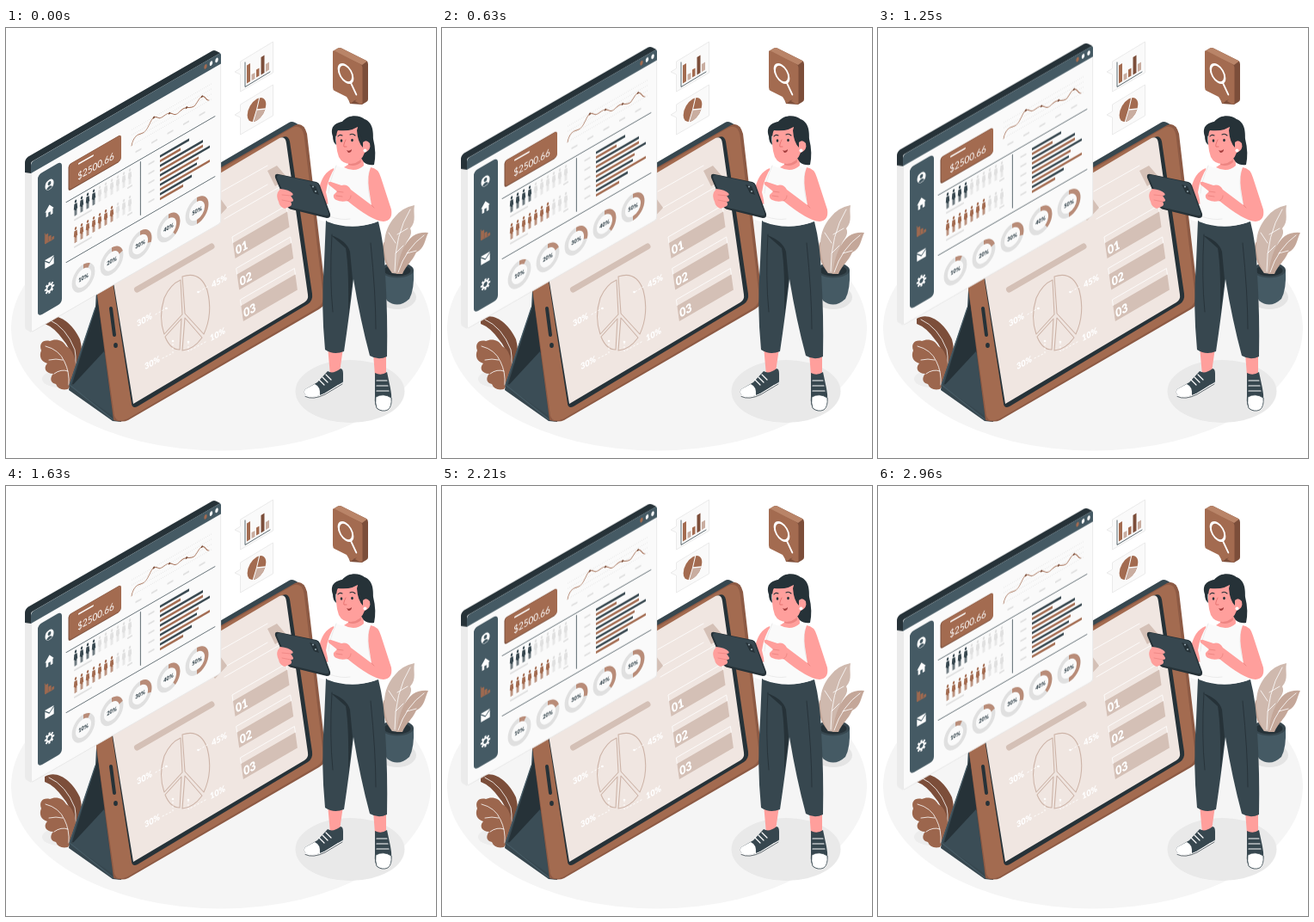
These frames come from a looping animation (500 px wide and 500 px high, 3 s). An HTML page:

```html
<!DOCTYPE html>
<html lang="en">
<head>
<meta charset="utf-8">
<title>Business analytics</title>
<style>
  html, body { margin: 0; width: 100%; height: 100%; overflow: hidden; background: #fff; }
  svg { display: block; width: 100vw; height: 100vh; }
  text { font-family: Lato, "Open Sans", sans-serif; text-anchor: middle; }
  .line { fill: none; stroke-linecap: round; stroke-linejoin: round; }
</style>
</head>
<body>
<svg viewBox="0 0 500 500">
  <ellipse cx="250" cy="349" rx="244" ry="142.500" fill="#f5f5f5"/>
  <ellipse cx="400" cy="422.500" rx="63.500" ry="36.500" fill="#e9e9e9"/>
  <ellipse cx="455" cy="313" rx="22" ry="14" fill="#e4e4e4"/>
  <ellipse cx="62" cy="408" rx="20" ry="10" fill="#ececec"/>

  <!-- left plant -->
  <g>
    <path d="M45 338C60 329 78 344 86 362Q92 384 80 412L74 408Q82 380 66 362Q56 348 45 344Z" fill="#7c4e3a"/>
    <path class="line" d="M50 339Q70 348 80 374Q83 390 78 404" stroke="#fff" stroke-width=".8"/>
    <path d="M41 375C38 367 43 362 51 364C57 361 66 362 70 370Q78 374 80 386Q83 398 78 410L72 420Q61 422 58 414C51 413 51 406 55 402C46 402 43 395 48 390C41 388 38 382 41 375Z" fill="#9c664d"/>
    <path class="line" d="M46 370Q62 374 68 388Q74 400 73 415M50 386Q58 384 66 386M56 402Q64 396 72 399" stroke="#fff" stroke-width=".8"/>
  </g>

  <!-- stand -->
  <g>
    <path d="M106 285L104 325L74 413L73 421L124 457L134 458L114 300Z" fill="#37474f"/>
    <path d="M107 316L116 376L80 415L77 414Z" fill="#263238"/>
    <path d="M114 376L76 417L124 451Z" fill="#3b4d56"/>
    <path class="line" d="M104 325L74 415L124 455" stroke="#455a64" stroke-width="1.200"/>
  </g>

  <!-- tablet -->
  <g>
    <path d="M100 244L329 110Q332 108 336 110L347 116L340 124L104 262Z" fill="#37474f"/>
    <path d="M98 249L336 113Q346 109 350 123L372 312Q373 322 364 327L142 456Q136 459 125 456Z" fill="#8d5a44"/>
    <path d="M98 252L333 116Q344 111 346.500 125L369 313Q369 321 362 325.500L141 454.500Q129 460 126 451Z" fill="#a36b50"/>
    <path d="M117 249L319 128Q328 123 330 132L356 309Q357 317 351 321L153 440Q147 443 146 437Z" fill="#263238"/>
    <path d="M117 247L318 128Q325 125 326 134L351 310Q352 316 347 319L148 437Z" fill="#f0e6e1"/>
    <path class="line" d="M122 326L126 357" stroke="#263238" stroke-width="4"/>
    <ellipse cx="127.500" cy="369" rx="2.400" ry="3" fill="#263238"/>

    <path class="line" d="M251 190L304 160M254 222L318 185M257 209L304 182" stroke="#fff" stroke-width=".8"/>
    <path d="M234 213L249 198L257 209L243 224Z M304 166L315 160L327 174L313 184Z" fill="#d4c0b6"/>
    <path class="line" d="M152.500 304L239 254" stroke="#d4c0b6" stroke-width="7"/>
    <g id="bars"></g>

    <g class="line" stroke="#cdb4a8" stroke-width="1.100">
      <path d="M203 293L205 333L184 356Q177 336 184 314Q191 298 203 293Z"/>
      <path d="M205 289Q226 282 234 305Q241 332 230 356L208 332Z"/>
      <path d="M204 338L202 374Q191 374 185 359Z"/>
      <path d="M208 337L228 360Q218 374 205 375Z"/>
    </g>
    <path class="line" d="M174 333L186 326M234 301L224 307M182 384L194 378V364M232 365L212 376V365" stroke="#fff" stroke-width=".9" stroke-dasharray="1.500 3"/>
    <g fill="#fff">
      <circle cx="186.500" cy="326" r="1.300"/><circle cx="223.500" cy="307" r="1.300"/>
      <circle cx="194" cy="364" r="1.300"/><circle cx="212" cy="365" r="1.300"/>
    </g>
    <g id="shares"></g>
  </g>

  <!-- small cards -->
  <g fill="#fafafa" stroke="#e6e6e6" stroke-width=".8">
    <path id="card" d="M272.500 39L310.500 16V52L272.500 74V54L266 51L272.500 47Z"/>
    <use href="#card" y="50"/>
  </g>
  <path d="M280 43.500L284 41V62L280 64.500Z M291 48.500L294.500 46.500V55.500L291 57.500Z" fill="#a36b50"/>
  <path d="M285.500 54L289.500 52V59L285.500 61Z M302 42L306 39.500V48.500L302 51Z" fill="#c9ada0"/>
  <path d="M296.500 34L300.500 31.500V52L296.500 54.500Z" fill="#7c4e3a"/>
  <path class="line" d="M278 40V68.500L307 51" stroke="#37474f" stroke-width=".8"/>
  <g transform="translate(291.500 95) matrix(.866 -.5 0 1 0 0)">
    <circle r="12.500" fill="#a36b50"/>
    <path d="M0 0L11.500 5A12.500 12.500 0 0 1 -5 11.500Z" fill="#c9ada0"/>
    <path d="M4-13L0 0L12 5M0 0L-5 12" fill="none" stroke="#fafafa" stroke-width="1.300"/>
  </g>

  <!-- search bubble -->
  <g>
    <path d="M380 27L386 23.500Q388 22.500 390 23.500L419 38Q421 39 421 42V83Q421 85 419 86L414 89L400 88Z" fill="#7c4e3a"/>
    <path d="M380 27L386 23.500Q388 22.500 390 23.500L420 38.500L414 43Z" fill="#b98468"/>
    <path d="M380 29Q380 26 383 27L412 42Q414.500 43.500 414.500 46V87Q414.500 89.500 411 88L405 84.500L401 88L396 80L382 73Q380 72 380 69Z" fill="#a36b50"/>
    <path d="M401 88L405 84.500L408 83L404 87Z" fill="#7c4e3a"/>
    <g class="line" transform="matrix(.866 .5 0 1 395 53)" stroke="#fff" stroke-width="2.600">
      <circle r="9.500"/>
      <path d="M7 7.500L14 17"/>
    </g>
  </g>

  <!-- potted plant -->
  <g>
    <path d="M436 282H474Q475 304 469 315Q456 327 443 317Q435 304 436 282Z" fill="#455a64"/>
    <ellipse cx="455" cy="281.500" rx="19" ry="9" fill="#37474f"/>
    <ellipse cx="455" cy="282" rx="15.500" ry="6.500" fill="#263238"/>
    <path d="M449 285C440 274 436 262 439 249Q450 254 454 285Z" fill="#c4a799"/>
    <path d="M449 285C436 262 437 236 452 220Q460 209 475 206C473 216 478 224 470 233C474 241 466 246 464 253Q461 268 457 286Z" fill="#cfb9ae"/>
    <path d="M454 286C457 264 463 250 473 242Q481 237 491 238C487 246 487 256 477 261C472 272 465 276 461 286Z" fill="#c4a799"/>
    <path class="line" d="M452 283Q452 240 470 211M453 250L445 238M455 240L467 233M453 262L462 253M456 284Q465 256 486 241M466 262L477 259" stroke="#fff" stroke-width=".8"/>
  </g>

  <!-- woman -->
  <g>
    <path d="M374 370L392 372L388 400L377 404Z M427 378L442 378L442 404L429 404Z" fill="#ff9f9c"/>
    <path d="M374 399Q380 403 389 396Q392 396 392 402V411Q391 414 386 415L371 425Q358 432 349 427Q345 424 348 420L362 412Z" fill="#37474f"/>
    <path d="M359 414Q366 417 365 427Q355 431 349 427Q345 424 348 420Z" fill="#fff"/>
    <path class="line" d="M348 427Q357 432 371 425L391 413" stroke="#fff" stroke-width="1.300"/>
    <path class="line" d="M348 428.500Q357 433 371 426L391 414" stroke="#263238" stroke-width=".7"/>
    <path class="line" d="M364 409L370 415M368 406L374 412M372 403L378 409" stroke="#fff" stroke-width="1.200"/>
    <path d="M429 401Q436 405 443 400L447 419Q450 434 446 441Q440 448 432 443Q428 438 429 428Z" fill="#37474f"/>
    <path d="M430 429Q439 424 448 430Q449 440 444 444Q437 447 431 442Q429 436 430 429Z" fill="#fff" stroke="#37474f" stroke-width=".8"/>
    <path class="line" d="M431 410H443M431 416H444M431 422H445" stroke="#fff" stroke-width="1.200"/>

    <path d="M372 224Q402 236 433 225Q440 252 441 286Q444 335 443 382Q433 387 423 381Q412 340 404 292Q399 336 393 376Q381 381 371 374Q366 322 370 272Z" fill="#37474f"/>
    <path d="M378 241Q396 247 400 260L403 292L398 334Q399 280 395 256Z" fill="#263238"/>
    <path class="line" d="M379 240Q376 290 380 330M424 250Q430 310 430 350" stroke="#263238" stroke-width=".9"/>

    <path d="M381 163Q368 168 364 187L362 204L378 205L386 176Z" fill="#ff9f9c"/>
    <path d="M384 160Q396 166 413 160L424 163Q429 178 427 195Q427 212 430 226Q401 236 373 225Q377 208 372 191Q374 175 384 160Z" fill="#fafafa"/>
    <path class="line" d="M384 160Q376 178 375 192M422 168Q419 188 425 204M376 219Q390 224 400 222" stroke="#e8e8e8" stroke-width=".8"/>
    <path d="M398 148L415 142L416 160Q406 169 393 162L399 158Z" fill="#ff9f9c"/>
    <path d="M398 156Q407 155 412 149L413 156Q406 162 398 159Z" fill="#ed8582"/>

    <path d="M380 126C376 114 384 110 391 109C398 100 411 101 417 106C427 110 427 121 427 129Q431 145 428 159Q421 160 416 156L409 145L407 122Z" fill="#263238"/>
    <path d="M385 119Q398 119 409 114Q411 127 415 133Q419 129 423 134Q425 142 417 145Q413 157 401 158Q391 158 387 150Q382 136 385 119Z" fill="#ff9f9c"/>
    <path d="M380 126Q379 113 391 109Q408 102 413 112Q403 121 386 119Q382 124 384 136Q380 133 380 126Z" fill="#263238"/>
    <path d="M410 112Q412 126 415 132V139Q409 133 408 119Z" fill="#263238"/>
    <circle cx="417.500" cy="142.500" r="2" fill="#fff"/>
    <ellipse cx="390" cy="131" rx="1.300" ry="1.800" fill="#263238"/>
    <ellipse cx="402.500" cy="130.500" rx="1.300" ry="1.800" fill="#263238"/>
    <path class="line" d="M386 126Q388 123.500 391 125M400 124Q403 122 406 125" stroke="#263238" stroke-width="1.100"/>
    <path class="line" d="M395 130Q392 136 393 138H396" stroke="#e46f6c" stroke-width=".9"/>
    <path d="M396 142Q399 144 402 141Q402 145 398 145Z" fill="#a33c3c"/>

    <path d="M317 170L361 179Q364 180 365 183L377 216Q378 221 373 221L332 211Q328 210 327 207L313 174Q312 169 317 170Z" fill="#263238"/>
    <path d="M319 171L361 180Q363 181 364 184L375 215Q376 219 371 218L333 209Q330 208 329 206L315 174Q315 170 319 171Z" fill="#37474f"/>
    <path d="M353 182L360 184L364 194L358 192Z" fill="#263238"/>
    <circle cx="357" cy="184.500" r="1.100" fill="#8fa0a8"/><circle cx="360" cy="190" r="1.100" fill="#8fa0a8"/>
    <path d="M319 187Q329 188 333 192Q335 195 331 195L333 198Q336 202 331 202Q334 206 329 208L324 210Q318 208 317 202Q314 196 316 191Z" fill="#ff9f9c"/>
    <path class="line" d="M321 194L331 195M321 200L331 202" stroke="#ed8582" stroke-width=".8"/>

    <path d="M424 162Q433 163 436 174L448 211Q450 224 439 225Q425 224 397 201Q390 203 384 200Q380 198 381 194L385 190L375 182Q374 178 378 179L390 183Q397 181 401 188L425 206L422 187Q420 172 424 162Z" fill="#ff9f9c"/>
    <path class="line" d="M385 190L392 191M384 195L391 196M425 206L428 209M397 201Q401 199 401 195" stroke="#ed8582" stroke-width=".9"/>
  </g>

  <!-- floating dashboard -->
  <g id="panel">
    <path d="M22 164L29 168V354L24 351Q22 350 22 347Z" fill="#ebebeb"/>
    <path d="M22 168V157Q22 152 26 149.500L240 26.500Q242 25.500 244 26.500L249 29L250 32L32 168L29 169Z" fill="#263238"/>
    <g id="face" transform="matrix(1 -.577 0 1 29 156)"></g>
  </g>
</svg>
<script>
const DARK = '#37474f', SLATE = '#455a64', BROWN = '#a36b50', GREY = '#e0e0e0';
const byId = id => document.getElementById(id);
const face = [];

const rect = (x, y, w, h, fill, r = 0) =>
  `<rect x="${x}" y="${y}" width="${w}" height="${h}" rx="${r}" fill="${fill}"/>`;
const path = (d, fill, stroke = 'none', width = 1) =>
  `<path class="line" d="${d}" style="fill:${fill}" stroke="${stroke}" stroke-width="${width}"/>`;
// Keeps isometric proportions for round shapes and text.
const iso = (x, y, inner) => `<g transform="translate(${x} ${y}) scale(.866 1)">${inner}</g>`;
const label = (s, size, fill, weight = 700) =>
  `<text y="${size * .36}" font-size="${size}" font-weight="${weight}" fill="${fill}">${s}</text>`;
const onScreen = (x, y, inner) =>
  `<g transform="matrix(.866 -.5 .14 .98 ${x} ${y})">${inner}</g>`;

// Tablet bars and pie labels
byId('bars').innerHTML = ['01', '02', '03'].map((n, i) => {
  const x = 263 + i * 4.7, y = 243 + i * 36.5;
  return path(`M${x + 1} ${y + 7}l-1-7l63-36.500l1 7`, 'none', '#fff', .8) +
    path(`M${x + 1} ${y + 7}l63-36.500l2.500 18l-63 36.500z`, '#d4c0b6') +
    onScreen(x + 11, y + 12, label(n, 14, '#fff', 900));
}).join('');
byId('shares').innerHTML = [['30%', 161, 339], ['45%', 248, 294], ['30%', 170, 389], ['10%', 246, 356]]
  .map(([s, x, y]) => onScreen(x, y, label(s, 10, '#fff', 900))).join('');

// Window
face.push(rect(0, 0, 221, 198, '#fafafa', 2),
  path('M.4 12V196Q.4 198 3 198H218Q220.700 198 220.700 195V12', 'none', '#e6e6e6', .8),
  path('M0 13V4Q0 0 4 0H218Q221 0 221 3V13Z', SLATE));
[203, 209.5, 216].forEach((x, i) =>
  face.push(`<ellipse cx="${x}" cy="6" rx="1.700" ry="2.600" fill="${i ? '#fff' : BROWN}"/>`));

// Sidebar with icons
face.push(rect(8, 19.5, 28, 165, SLATE, 5));
const gear = Array.from({ length: 8 }, (_, i) =>
  `<rect x="-1.200" y="-6.500" width="2.400" height="3.500" fill="#fff" transform="rotate(${i * 45})"/>`).join('');
const icons = [
  `<circle r="5.800" fill="#fff"/><circle cy="-1.500" r="2.200" fill="${SLATE}"/><path d="M-4 4Q0-1 4 4Q0 7-4 4Z" fill="${SLATE}"/>`,
  path('M-6 0L0-6.500L6 0H4.500V6H1.500V2H-1.500V6H-4.500V0Z', '#fff'),
  path('M-6-6V6H6V3H3.500V6H2V0H-1V6H-2V-4H-5V6Z', BROWN, BROWN, .5),
  rect(-6, -5, 12, 10, '#fff', .5) + path('M-6-4L0 1L6-4', 'none', SLATE, 1),
  gear + '<circle r="3.600" fill="none" stroke="#fff" stroke-width="2"/>'
];
icons.forEach((icon, i) => face.push(iso(21.5, 38.5 + i * 30, icon)));

// Amount box
face.push(rect(43.5, 28, 61, 31, '#7c4e3a', 3), rect(44.5, 28.5, 60.5, 29.5, BROWN, 3),
  rect(55, 33, 18, 1.8, '#fff', .9), iso(75.5, 48, label('$2500.66', 11.5, '#fff', 400)));

// Trend line
for (let y = 30; y <= 48; y += 6)
  face.push(`<path d="M117 ${y}H211" stroke="#dedede" stroke-width=".5" stroke-dasharray="1 1"/>`);
face.push(path('M117 48.500Q119 40 124 40C129 40 130 43 134 40C138 37 139 30.500 143 30.500S148 36 152 35.700S157 34 161 36S167 43 171 41.700S177 39 181 41S188 46 191 44S195 38 199 38.500S203 46 207 47.500', 'none', BROWN, .8));
[[143, 30.5], [161, 36], [181, 41], [199, 38.5]].forEach(([x, y]) =>
  face.push(`<circle cx="${x}" cy="${y}" r="1.200" fill="#7c4e3a"/>`));
for (let i = 0; i < 5; i++) face.push(rect(121.5 + i * 18.5, 57.5, 7, 2, GREY, .5));

// Dividers
face.push(path('M41 70.200H214M41 140.200H214M127.300 73V135', 'none', DARK, .8));

// People counters
const person = (x, y, fill) => `<g transform="translate(${x} ${y})" fill="${fill}">` +
  '<ellipse cy="-7.500" rx="1.200" ry="1.700"/>' +
  '<path d="M-1.600-5H1.600L2.200 1.500H1.400L1.300 9H.3V3H-.3V9H-1.300L-1.400 1.500H-2.200Z"/></g>';
[[83, 4, DARK], [114.5, 7, BROWN]].forEach(([y, on, fill]) => {
  for (let i = 0; i < 10; i++) face.push(person(52 + i * 7, y, i < on ? fill : GREY));
  face.push(rect(50, y + 12.5, 21, 2, GREY, .8), rect(112, y + 11, 6, 2, GREY, .8));
});

// Paired bars
const darkLen = [34, 50, 58, 43, 37], brownLen = [24, 50, 45, 58, 27];
darkLen.forEach((w, i) => {
  const y = 78.5 + i * 11;
  face.push(rect(150, y, w, 2.8, DARK), rect(150, y + 5.5, brownLen[i], 2.8, BROWN),
    rect(136.5, y + 2, 7, 2, GREY, .5));
});

// Progress rings
for (let i = 0; i < 5; i++) {
  const pct = (i + 1) * 10;
  face.push(iso(61 + i * 33, 169.5 - i * .4,
    `<g fill="none" stroke-width="5" transform="rotate(-90)"><circle r="13" stroke="${GREY}"/>` +
    `<circle r="13" stroke="#b98c78" pathLength="100" stroke-dasharray="${pct} 100"/></g>` +
    label(pct + '%', 6.6, DARK, 900)));
}
byId('face').innerHTML = face.join('');

byId('panel').animate(
  [0, -10, 0].map(y => ({ transform: `translateY(${y}px)` })),
  { duration: 3000, iterations: Infinity, easing: 'linear' });
</script>
</body>
</html>
```
